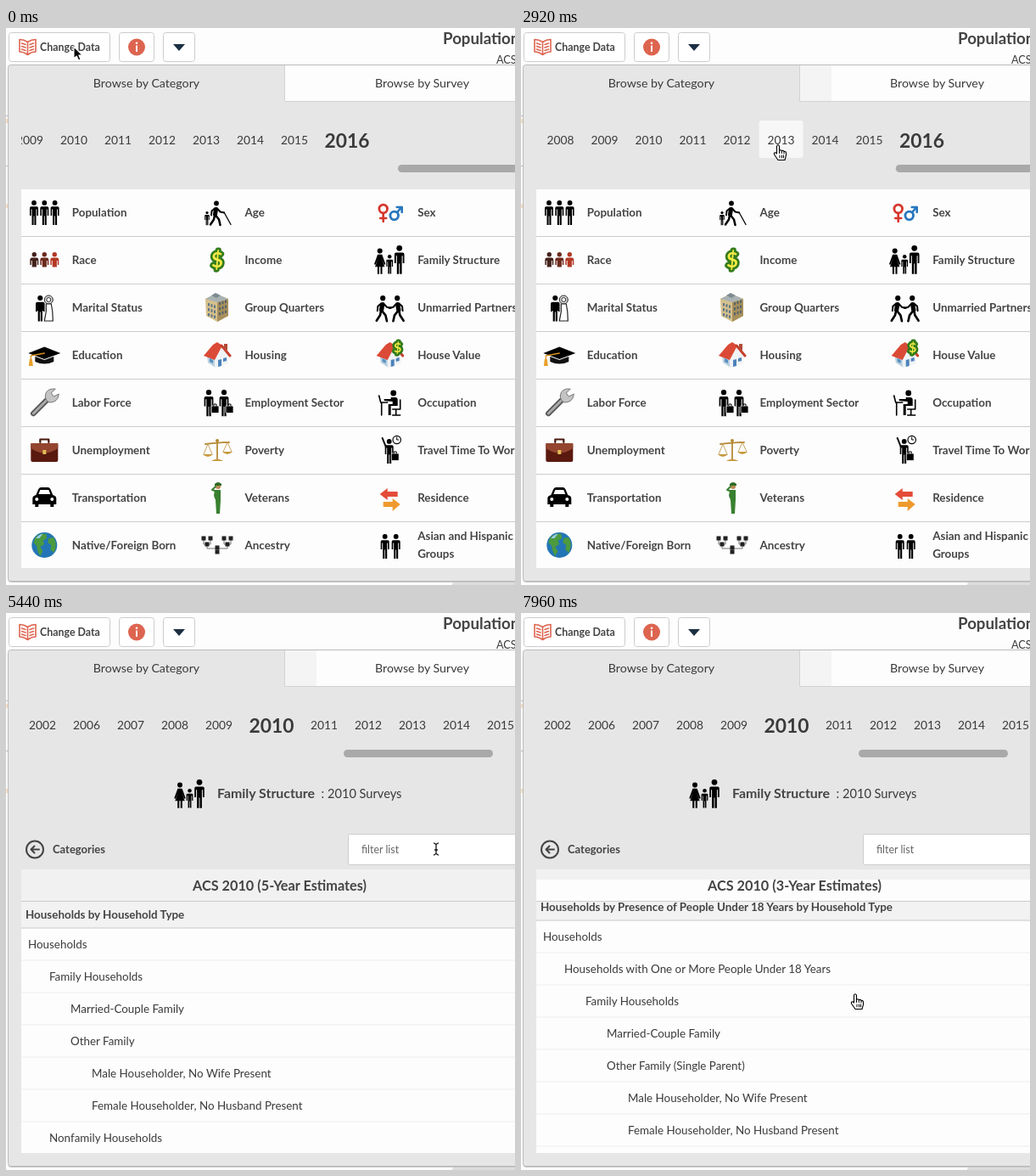
These frames come from a looping animation (600 by 656 pixels, 8 s). An HTML page:

```html
<!DOCTYPE html>
<html lang="en">
<head>
<meta charset="utf-8">
<title>Browse survey data</title>
<style>
  html, body { margin: 0; width: 100%; height: 100%; overflow: hidden; background: #fdfdfd; }
  svg { display: block; width: 600px; height: 656px; font-family: Lato, sans-serif; }
  text { fill: #3a3a3a; }
  .b { font-weight: 700; fill: #444; }
  .m { text-anchor: middle; }
  .line { fill: none; stroke: #000; stroke-width: 2; stroke-linecap: round; stroke-linejoin: round; }
</style>
</head>
<body>
<svg id="stage" viewBox="0 0 600 656"></svg>
<script>
const LOOP = 8000, STEP = 147.8;

const rect = (x, y, w, h, fill, more = '') => `<rect x="${x}" y="${y}" width="${w}" height="${h}" fill="${fill}" ${more}/>`;
const text = (x, y, size, str, cls = '', more = '') => `<text x="${x}" y="${y}" font-size="${size}" class="${cls}" ${more}>${str}</text>`;
const path = (d, fill = '#000', more = '') => `<path d="${d}" fill="${fill}" ${more}/>`;
const stroke = (d, color = '#000', width = 2) => `<path d="${d}" class="line" style="stroke:${color};stroke-width:${width}"/>`;
const dot = (x, y, r, fill, more = '') => `<circle cx="${x}" cy="${y}" r="${r}" fill="${fill}" ${more}/>`;
const group = (x, y, body, more = '') => `<g transform="translate(${x} ${y})" ${more}>${body}</g>`;
const figure = (id, x, y, scale = 1) => `<use href="#${id}" transform="translate(${x} ${y}) scale(${scale})"/>`;
const man = (...a) => figure('man', ...a);
const button = (x, w) => rect(x, 5.5, w, 34, '#fff', 'rx="3" stroke="#ccc"');

const defs = `<defs>
  <g id="man">${dot(0, 2.9, 2.9, '#000')}${path('M-5 9q0-1.700 1.700-1.700h6.600q1.700 0 1.700 1.700v9h-1.600v-7.500h-.9v18.500h-2.100v-10.500h-.8v10.500h-2.100v-18.500h-.9v7.500h-1.600z')}</g>
  <g id="woman">${dot(0, 3, 2.9, '#000')}${path('M-2.500 7h5l4 11-1.600.6-2.900-7 3.500 9.400h-2.800v8h-2v-8h-1.400v8h-2v-8h-2.800l3.500-9.400-2.900 7-1.600-.6z')}</g>
  <g id="walker">${dot(0, 3, 2.9, '#000')}${stroke('M-.5 10L-1.500 16', '#000', 5)}${stroke('M-2 17L-3 22L-7 28M-1 17L3 22L4.500 28.500', '#000', 2.5)}${stroke('M1 9L4.500 13L9 14M-2 9L-5.500 12L-6 17', '#000', 1.9)}</g>
  <clipPath id="yearClip"><path d="M18 100h582v72H18z"/></clipPath>
  <clipPath id="listClip"><path d="M18 340h582v296H18z"/></clipPath>
</defs>`;

// Icons, each centred on 0,0
const dollar = (x, y, size) => text(x, y + size * .36, size, '$', 'b m',
  'style="fill:#f3ea45;stroke:#347c1c;stroke-width:5.5;paint-order:stroke;stroke-linejoin:round"');
const house = path('M-12 0L-2 5V15L-11 9Z', '#b9d0df') + path('M-3 15V4L6-10L13 1V10Z', '#f0f3f5') +
  path('M-5-12L0-15L6-11L-3 6L-16 1Z', '#db4a36') + stroke('M5-11L15 1', '#c5402d', 3) + path('M8-13h4v8l-4-4z', '#b04a38') +
  path('M-9 4l4 2v4l-4-2z', '#5a8fc0') + path('M1 6l4-1v8l-4 1zM7 4l4-1v4l-4 1z', '#4d83bb');
const briefcase = x => rect(x - 4.5, 4, 9, 8.5, '#000', 'rx="1" stroke="#fff" stroke-width=".8"') + stroke(`M${x - 1.5} 4v-2h3v2`, '#000', 1);
const bust = (x, c) => dot(x, -6.3, 2.7, c) + path(`M${x - 5} 6V0q0-2.500 2-2.500h6q2 0 2 2.500V6h-1.500V1h-.9V8.500h-5.200V1h-.9V6z`, c);
const family = figure('woman', -12, -13.5, 1.04) + man(-.5, -6, .78) + man(11, -17, 1.16);
const icons = {
  population: man(-12.3, -14) + man(0, -14) + man(12.3, -14),
  age: man(-12, -1, .56) + figure('walker', -1, -13.5, 1) + stroke('M8 0L16 14.500', '#000', 1.3),
  sex: dot(-8, -4, 4.8, 'none', 'stroke="#d6372c" stroke-width="2.8"') + stroke('M-8 2v9M-11.500 7h7', '#d6372c', 2.6) +
    dot(5, 4, 4.8, 'none', 'stroke="#2777bd" stroke-width="2.8"') + stroke('M8.500 0l5-6M8-6h6v6', '#2777bd', 2.6),
  race: bust(-12, '#43221b') + bust(0, '#6d2a1d') + bust(12, '#b23824'),
  income: dollar(0, 0, 24),
  family,
  marital: man(-5, -14, 1.05) + path('M-9-6h8V4h-8z') + dot(5, -9, 5, '#ddd', 'stroke="#222"') + dot(5, -9, 2.5, '#fff', 'stroke="#222"') +
    path('M2-4h6l1.500 9 .5 11H0L2 5z', '#fff', 'stroke="#222" stroke-width="1.2"'),
  quarters: path('M-14-10L-2-16L13-10V10L0 17L-13 10Z', '#d6c08c') + path('M0-6L13-10V10L0 17Z', '#a8905c') +
    path('M-14-10L-2-16L13-10L0-6Z', '#a9b2b4') + path('M-7-14l5-3 6 3-5 3z', '#7d8b90') +
    ['#5d7688', '#56626a'].map((c, side) => [-4, 2, 8].map(y => [3, 6.5, 10].map(x =>
      rect(side ? x - 1 : -x - 1, y + (side ? -x : 10 - x) * .35 - 1, 2, 3.4, c)).join('')).join('')).join(''),
  partners: figure('walker', -8.5, -14, 1.06) + `<g transform="scale(-1 1)">${figure('walker', -8.5, -14, 1.06)}</g>`,
  education: path('M-19-2L0-9.500L19-2L0 5Z') + path('M-11 2L0 6L11 2V8Q0 13-11 8Z', '#111') + stroke('M0-2L-16 1V7', '#d9911c', 1.3) + path('M-17.500 5h3l1 8h-5z', '#e9a12a'),
  housing: house,
  value: house + dollar(9, -9, 16),
  labor: stroke('M-13 13L4-4', '#555', 6.5) + stroke('M-13 13L4-4', '#aaa', 3) +
    path('M1-8Q2-17 13-16L8-11L11-7L17-10Q16 0 6 0Q1-2 1-8Z', '#c4c4c4', 'stroke="#777"'),
  sector: man(-10, -15, 1.08) + man(8, -15, 1.08) + briefcase(-2.5) + briefcase(14.5),
  occupation: dot(4, -11, 3.4, '#000') + path('M1-6h5q3 0 3 3V4H1V15h-3V2h5V-1L-7-2V-4h8z') + stroke('M-13-8l2 8h8M-10 0V15M12-3V8H3M7 8v7M3 15h9', '#000', 1.6),
  unemployment: rect(-16, -8, 32, 22, '#59190f', 'rx="2"') + path('M-16-8h32v6Q0 9-16-2z', '#93452f') +
    stroke('M-5-9v-3.500H5v3.500', '#49180e', 2.2) + rect(-2, 0, 4, 5, '#e3bd54'),
  poverty: stroke('M0-11V12M-14-7Q0-9 14-9', '#b58a35', 1.8) + stroke('M-11-7l-5 12M-11-7l5 12M12-9L7 2M12-9l5 11', '#c9a560', 1) +
    path('M-17 5h12q-6 6-12 0zM6 2h12q-6 6-12 0zM-7 13q7-5 14 0z', '#c79a3f') + dot(0, -11, 2, '#b58a35'),
  travel: man(-1, -13, 1) + stroke('M-5-4L-9-14', '#000', 2) + briefcase(6) + dot(8, -12, 4.7, '#fff', 'stroke="#000" stroke-width="1.2"') + stroke('M8-15v3l2 0', '#000', 1),
  transport: path('M-10-3L-7-10Q-6-12-4-12H4Q6-12 7-10L10-3Q14-2 14 1V8H11V11H7V8H-7V11H-11V8H-14V1Q-14-2-10-3Z') +
    path('M-7-4L-5-9H5L7-4Z', '#fff') + dot(-9, 2, 2, '#fff') + dot(9, 2, 2, '#fff'),
  veterans: dot(1, -13, 3, '#b98955') + path('M-3-16q4-4 8 0v2h-8z', '#2d6b23') +
    path('M-3-9H4L4 3L3 19H-1L-2 3L-4-2Z', '#398030') + stroke('M-3-8l-3-1 4-4', '#398030', 2),
  residence: path('M-12-4L-3-11V-7H9V-1H-3V3Z', '#e44b38') + path('M12 8L3 1V5H-8V11H3V16Z', '#ef9a2e'),
  native: dot(0, 0, 15, '#2376b5') + path('M-11-9Q-4-15 2-13L3-8L-2-5L0-1L-5 2L-2 7L-5 13Q-9 6-9 1L-13-3ZM5-8L11-9Q16 0 11 9L7 5L8 0L4-3Z', '#4c9a3f') +
    path('M-10-8q4-5 8-5l-4 5z', '#9bd0ec'),
  ancestry: stroke('M-16-7v6H-8V-7M-12-1V4H12V-1M8-7v6H16V-7M0 4V8', '#777', 1) +
    [[-16, -8], [-8, -8], [8, -8], [16, -8], [-12, -1], [12, -1], [0, 8], [0, 3]].map(([x, y]) => rect(x - 2.5, y - 2.5, 5, 5, '#222')).join(''),
  groups: man(-6, -13) + man(7, -13),
};

const cells = [
  ['population', 'Population'], ['age', 'Age'], ['sex', 'Sex'],
  ['race', 'Race'], ['income', 'Income'], ['family', 'Family Structure'],
  ['marital', 'Marital Status'], ['quarters', 'Group Quarters'], ['partners', 'Unmarried Partners'],
  ['education', 'Education'], ['housing', 'Housing'], ['value', 'House Value'],
  ['labor', 'Labor Force'], ['sector', 'Employment Sector'], ['occupation', 'Occupation'],
  ['unemployment', 'Unemployment'], ['poverty', 'Poverty'], ['travel', 'Travel Time To Work'],
  ['transport', 'Transportation'], ['veterans', 'Veterans'], ['residence', 'Residence'],
  ['native', 'Native/Foreign Born'], ['ancestry', 'Ancestry'], ['groups', 'Asian and Hispanic|Groups'],
];
const cell = ([icon, label], i) => {
  const lines = label.split('|');
  const body = icons[icon] + lines.map((s, n) => text(32.5, (lines.length > 1 ? -6 : 5) + 21 * n, 13.4, s, 'b')).join('');
  return group(45.3 + 203.7 * (i % 3), 217 + 56 * Math.floor(i / 3), body, `id="${icon}"`);
};
const rules = [1, 2, 3, 4, 5, 6, 7].map(i => rect(18, 189 + 56 * i, 582, 1, '#ccc')).join('');
const grid = rect(18, 190, 582, 446, '#fdfdfd') + rules + cells.map(cell).join('');

// Survey list
const household = (level, single = '') => [
  [level, 'Family Households'], [level + 1, 'Married-Couple Family'], [level + 1, 'Other Family' + single],
  [level + 2, 'Male Householder, No Wife Present'], [level + 2, 'Female Householder, No Husband Present'],
  [level, 'Nonfamily Households'], [level + 1, 'Male Householder'], [level + 1, 'Female Householder'],
];
const tables = [
  ['Households by Household Type', [[0, 'Households'], ...household(1)]],
  ['Households by Presence of People Under 18 Years by Household Type', [
    [0, 'Households'], [1, 'Households with One or More People Under 18 Years'], ...household(2, ' (Single Parent)'),
    [1, 'Households with No People Under 18 Years'], ...household(2)]],
];
const surveyTitle = n => `ACS 2010 (${n}-Year Estimates)`;
let listEnd = 339.5;
const addTables = () => tables.map(([heading, rows]) => {
  let out = rect(18, listEnd, 582, 32, '#f2f2f2') + rect(18, listEnd + 31, 582, 1, '#ccc') + text(23, listEnd + 20.3, 13.4, heading, 'b');
  listEnd += 32;
  for (const [level, label] of rows) {
    out += rect(18, listEnd + 37, 582, 1, '#eee') + text(26 + 25 * level, listEnd + 23.3, 13.4, label);
    listEnd += 38;
  }
  return out;
}).join('');
let list = addTables();
const secondTitle = listEnd;
list += rect(18, listEnd, 582, 37.5, '#f0f0f0') + rect(18, listEnd + 36.5, 582, 1, '#ccc') + text(322.5, listEnd + 24.5, 16.25, surveyTitle(3), 'b m');
listEnd += 37.5;
list += addTables();

const surveys = group(217, 213, family) + text(249, 218, 15.9, 'Family Structure', 'b') + text(371.5, 218, 14.6, ':') + text(379, 218, 14.6, '2010 Surveys') +
  dot(34, 278.5, 10, 'none', 'stroke="#444" stroke-width="2"') + stroke('M39 278.5H29.5M33.5 274.5l-4 4 4 4', '#444', 2) +
  text(55, 283, 13, 'Categories', 'b') +
  rect(403.5, 260.5, 210, 36, '#fff', 'rx="2" stroke="#ccc"') + text(419, 283, 12.4, 'filter list', '', 'style="fill:#666"') +
  rect(18, 302, 582, 334, '#fdfdfd') + `<g clip-path="url(#listClip)"><g id="list">${list}</g></g>` +
  rect(18, 302, 582, 38, '#f1f1f1') + rect(18, 314, 582, 25, '#fdfdfd', 'id="titleStrip"') + rect(18, 339, 582, 1, '#ccc') +
  text(322.5, 326.5, 16.25, '', 'b m', 'id="title"');

const years = [2002, 2006, 2007, 2008, 2009, 2010, 2011, 2012, 2013, 2014, 2015, 2016];
const ITEM = 52, ACTIVE = 72;

document.getElementById('stage').innerHTML = defs + rect(0, 0, 600, 656, '#fdfdfd') +
  rect(0, 103, 3, 1, '#bbb') + rect(0, 162, 3, 1, '#bbb') + rect(0, 107, 3, 5, '#f6dfc4') + rect(0, 207, 3, 5, '#f6dfc4') +
  button(3.5, 119) + button(133.5, 41) + button(185.5, 37) +
  stroke('M16 13.5q5 0 9.5 3q4.5-3 9.5-3v14.5q-5 0-9.5 3.5q-4.5-3.5-9.5-3.5zM25.5 17v14', '#dd6550', 1.6) +
  stroke('M18.5 18l4.5 1.5M18.5 21.500l4.5 1.5M18.5 25l4.5 1.5M32.5 18l-4.5 1.5M32.5 21.500l-4.5 1.5M32.5 25l-4.5 1.5', '#dd6550', 1.6) +
  text(40, 27, 12.4, 'Change Data', 'b') +
  dot(154, 22.5, 10, '#dd6550') + rect(153, 20.5, 2, 7.5, '#fff') + dot(154, 17.8, 1.3, '#fff') +
  path('M197 19h14l-7 8z', '#1c2f42') +
  text(515, 19, 18.7, 'Population', 'b') + text(578, 42, 12.7, 'ACS') +
  rect(526, 653, 80, 6, '#ddd', 'rx="2"') +
  rect(2.5, 44.5, 620, 608.5, '#c4c4c4', 'rx="4"') + rect(2.5, 43.5, 620, 608, '#e6e6e6', 'rx="3" stroke="#bbb"') +
  rect(329, 44, 271, 43, '#fdfdfd', 'id="tab"') + rect(329, 44, 37, 43, '#f4f4f4', 'id="tabTrace"') + path('M328.5 44V86.5H600', 'none', 'stroke="#d2d2d2"') +
  text(165.5, 70, 14.2, 'Browse by Category', 'm') + text(490.5, 70, 14.2, 'Browse by Survey', 'm') +
  `<g clip-path="url(#yearClip)">${rect(0, 109, ITEM, 44, '#f7f7f7', 'id="hover" rx="3"')}${years.map(y => text(0, 137, 13.8, y, 'm year')).join('')}</g>` +
  rect(462, 161, 176, 9, '#a9a9a9', 'id="thumb" rx="4.5"') +
  `<g id="grid">${grid}</g><g id="surveys">${surveys}</g>` +
  `<g id="cursor" stroke-width="1.1" stroke-linejoin="round">
    <g id="arrow">${path('M0 0V14L3.3 11L5.5 16L8 15L5.8 10H10Z', '#000', 'stroke="#fff"')}</g>
    <g id="hand">${path('M-1.5 10V1Q0-1.5 1.5 1V6.5Q3 5 4.3 6.7Q6 5.7 7 7.5Q9.5 7 9.5 9.5V12L8 17.5H0L-4.5 11Q-5 8.5-3 8.7Z', '#fff', 'stroke="#000"')}
      ${stroke('M1.5 6.5v3M4.3 7v2.5M7 8v2M2 12v3M4.5 12v3M6.5 12v3', '#000', 1)}</g>
    <g id="beam">${stroke('M-2.5-7L0-5.5L2.5-7M0-5.5V5.5M-2.5 7L0 5.5L2.5 7M-1.5 1h3', '#111', 1.3)}</g>
  </g>`;

const $ = id => document.getElementById(id);
const show = (id, on) => { $(id).style.display = on ? '' : 'none'; };
const yearTexts = [...document.querySelectorAll('.year')];

// Keys are [step, ...values], joined by straight lines
const track = (keys, k) => {
  const i = keys.findIndex(key => key[0] > k);
  if (i === 0) return keys[0].slice(1);
  if (i < 0) return keys[keys.length - 1].slice(1);
  const a = keys[i - 1], b = keys[i], u = (k - a[0]) / (b[0] - a[0]);
  return a.slice(1).map((v, n) => v + (b[n + 1] - v) * u);
};
const pointer = [[-1, 80, 22], [0, 100, 27], [2, 250, 45], [3, 335, 60], [5, 366, 115], [6, 360, 153], [7, 342, 140], [8, 303, 138],
  [19, 303, 138], [20, 272, 135], [21, 290, 165], [23, 390, 220], [26, 505, 270], [29, 505, 270], [30, 507, 278], [31, 507, 278], [32, 450, 368], [33, 394, 449]];
const listScroll = [[35, 0], [36, 45], [37, 150], [38, 276], [42, 831], [47, 1548.5]];

function draw(t) {
  const k = Math.floor((t - 1000) / STEP);
  const [x, y] = track(pointer, k);
  $('cursor').setAttribute('transform', `translate(${x} ${y})`);
  const beam = k === 30 || k === 31;
  show('arrow', t < 150);
  show('hand', t >= 150 && !beam);
  show('beam', beam);

  $('tab').setAttribute('fill', k === 3 || k === 4 ? '#f4f4f4' : '#fdfdfd');
  show('tabTrace', k >= 3);

  const u = Math.min(1, Math.max(0, (k - 9) / 8)), p = u * u * (3 - 2 * u);
  const active = k < 19 ? 2016 : 2010;
  let left = 17 - 223 * (1 - p);
  let hovered = null;
  years.forEach((year, i) => {
    const on = year === active, w = on ? ACTIVE : ITEM, el = yearTexts[i];
    el.setAttribute('x', left + w / 2);
    el.setAttribute('y', on ? 140.5 : 137);
    el.setAttribute('font-size', on ? 22.8 : 13.8);
    el.style.fontWeight = on ? 700 : 400;
    if (!on && k < 19 && y > 109 && y < 153 && x >= left && x < left + w) hovered = left;
    left += w;
  });
  show('hover', hovered !== null);
  $('hover').setAttribute('x', hovered ?? 0);
  $('thumb').setAttribute('x', 462 - 64 * p);

  show('grid', k < 30);
  show('surveys', k >= 30);
  $('travel').setAttribute('opacity', k < 19 ? 1 : .38);

  const [scroll] = track(listScroll, k);
  $('list').setAttribute('transform', `translate(0 ${-scroll})`);
  const second = secondTitle - scroll < 320;
  $('title').textContent = surveyTitle(second ? 3 : 5);
  show('titleStrip', second);
}

function frame() {
  draw(performance.now() % LOOP);
  requestAnimationFrame(frame);
}
frame();
</script>
</body>
</html>
```
